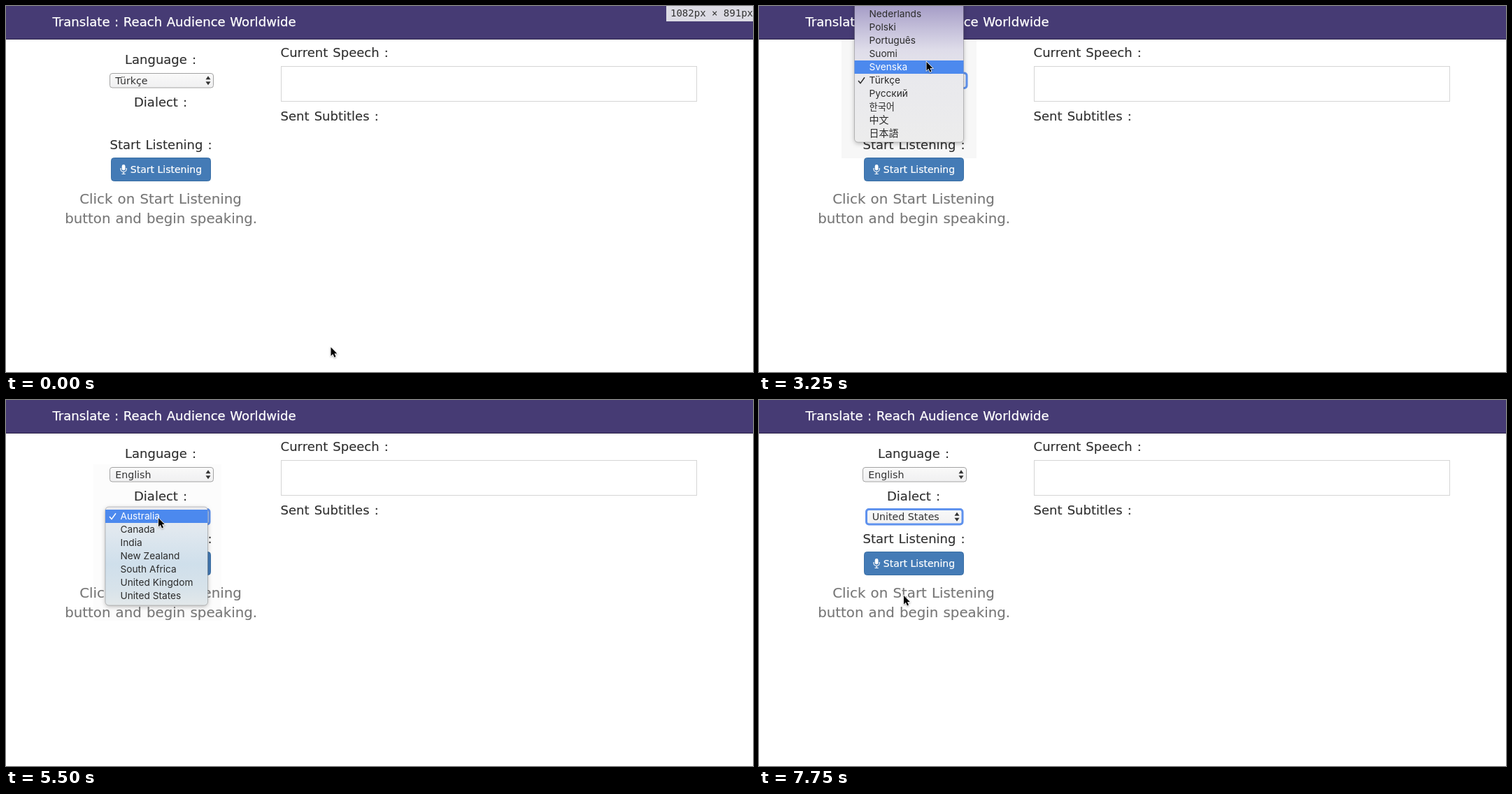
Recreate the animation shown at these times as an HTML page. Size 1068 by 524 pixels, loop 8000 ms.

```html
<!DOCTYPE html>
<html lang="en">
<head>
<meta charset="utf-8">
<title>Translate</title>
<style>
html, body { margin: 0; width: 100%; height: 100%; overflow: hidden; background: #fff; }
svg { display: block; width: 100%; height: 100%; }
text { font-family: "DejaVu Sans", sans-serif; white-space: pre; }
.title { font-size: 18.1px; word-spacing: .8px; fill: #fff; stroke: #fff; stroke-width: .25px; }
.label { font-size: 18px; word-spacing: 1.4px; fill: #2e2e2e; stroke: #2e2e2e; stroke-width: .12px; }
.hint { font-size: 19.8px; word-spacing: .9px; fill: #777; stroke: #777; stroke-width: .12px; }
.value { font-size: 14.2px; fill: #333; }
.button { font-size: 14px; fill: #fff; stroke: #fff; stroke-width: .2px; }
.size { font: 14px "DejaVu Sans Mono", monospace; fill: #333; }
.item { font: 13.7px Inter, "Noto Sans CJK SC", "Noto Sans CJK", sans-serif; fill: #2b2b2b; }
.ko { font-size: 13.2px; font-family: "Noto Sans CJK KR", "Noto Sans CJK", sans-serif; }
.cjk { font-size: 14px; }
.item.on { fill: #fff; }
.panel { stroke: #000; stroke-opacity: .2; filter: drop-shadow(0 2px 3px rgba(0, 0, 0, .25)); }
.tick { fill: none; stroke: #2b2b2b; stroke-width: 1.5; }
</style>
</head>
<body>
<svg viewBox="0 0 1068 524" xmlns="http://www.w3.org/2000/svg">
  <defs>
    <linearGradient id="field" x2="0" y2="1">
      <stop stop-color="#f9f9f9"/><stop offset="1" stop-color="#f0f0f1"/>
    </linearGradient>
    <linearGradient id="overHeader" gradientUnits="userSpaceOnUse" x1="0" x2="0" y1="0" y2="195">
      <stop stop-color="#a69dc7"/><stop offset=".16" stop-color="#c3bed9"/>
      <stop offset=".32" stop-color="#dedce9"/><stop offset=".52" stop-color="#e9e9ed"/>
      <stop offset="1" stop-color="#ececec"/>
    </linearGradient>
    <linearGradient id="overButton" gradientUnits="userSpaceOnUse" x1="0" x2="0" y1="153" y2="294">
      <stop stop-color="#ebebee"/><stop offset=".25" stop-color="#e0e8ef"/>
      <stop offset=".58" stop-color="#cfdfeb"/><stop offset=".85" stop-color="#d8e3ea"/>
      <stop offset="1" stop-color="#e3e8ea"/>
    </linearGradient>
  </defs>

  <rect width="1068" height="524" fill="#fff"/>
  <rect id="languageHalo" x="118" y="48" width="193" height="170" fill="#f7f7f7"/>
  <rect id="dialectHalo" x="125" y="92" width="183" height="224" fill="#fcfcfc"/>

  <rect width="1068" height="47" fill="#463b74"/>
  <rect y="47" width="1068" height="1" fill="#2a2147"/>
  <text class="title" x="66.4" y="28.5">Translate : Reach Audience Worldwide</text>
  <g id="sizeLabel">
    <rect x="944" width="124" height="22" fill="#dcdbe4"/>
    <text class="size" x="950" y="15">1082px × 891px</text>
  </g>

  <text class="label" x="170" y="82.5">Language :</text>
  <text class="label" x="183" y="143.5">Dialect :</text>
  <text class="label" x="148.5" y="204.5">Start Listening :</text>
  <text class="label" x="392.6" y="72.5">Current Speech :</text>
  <text class="label" x="392.6" y="163.5">Sent Subtitles :</text>
  <rect x="393.5" y="86.5" width="594" height="50" fill="#fff" stroke="#d5d5d5"/>

  <g id="selects"></g>

  <rect x="150.5" y="217.5" width="142" height="33" rx="4" fill="#447bb6" stroke="#3a6fa5"/>
  <g fill="none" stroke="#fff" stroke-width="1.2">
    <rect x="165.7" y="227" width="4.8" height="8.5" rx="2.4" fill="#fff" stroke="none"/>
    <path d="M164 232v1.5a4.1 4.1 0 0 0 8.2 0V232M168.1 237.5v3M165.5 240.5h5.2"/>
  </g>
  <text class="button" x="177.8" y="239">Start Listening</text>
  <text class="hint" x="105.3" y="283">Click on Start Listening</text>
  <text class="hint" x="84.2" y="311">button and begin speaking.</text>

  <g id="menus"></g>
  <path id="cursor" d="M0 0V12.4L2.9 9.7 5 14.5 7 13.6 5 8.9H8.8Z" fill="#000" stroke="#fff"
    stroke-width="1.5" paint-order="stroke" style="filter: drop-shadow(0 1px 1px rgba(0,0,0,.3))"/>
</svg>
<script>
const LOOP = 8000, ROW = 19;
const byId = id => document.getElementById(id);

function add(parent, tag, attributes, text = '') {
  const node = document.createElementNS('http://www.w3.org/2000/svg', tag);
  for (const [name, value] of Object.entries(attributes)) node.setAttribute(name, value);
  node.textContent = text;
  return parent.appendChild(node);
}

const show = (node, visible) => node.setAttribute('display', visible ? 'inline' : 'none');

function makeSelect(x, y, width) {
  const group = add(byId('selects'), 'g', { transform: `translate(${x} ${y})` });
  add(group, 'rect', { x: .5, y: .5, width: width - 1, height: 20.5, rx: 3.5,
    fill: 'url(#field)', stroke: '#a3a3a3' });
  const ring = add(group, 'rect', { width, height: 21.5, rx: 3.5,
    fill: 'none', stroke: '#5f92ee', 'stroke-width': 3 });
  const arrow = width - 8;
  add(group, 'path', { d: `M${arrow - 3.5} 9.2l3.5-5 3.5 5zM${arrow - 3.5} 12.3l3.5 5 3.5-5z`, fill: '#333' });
  const value = add(group, 'text', { class: 'value', x: 8.2, y: 15.6 });
  return { group, ring, value };
}

function makeMenu({ x, top, bottom, width, firstRow, textX, fill, items, checked }) {
  const group = add(byId('menus'), 'g', {});
  add(group, 'rect', { class: 'panel', x, y: top, width, height: bottom - top, rx: 5, fill });
  const bar = add(group, 'rect', { x, width, height: ROW, fill: '#4c89ee' });
  const labels = items.map((item, i) => {
    const script = /[가-힣]/.test(item) ? ' ko' : /[一-龥]/.test(item) ? ' cjk' : '';
    return add(group, 'text', { class: 'item' + script, x: textX, y: firstRow + ROW * i + 14 }, item);
  });
  const tick = add(group, 'path', { class: 'tick',
    d: `M${textX - 15.5} ${firstRow + ROW * checked + 10}l3 3.6 6-8.4` });
  return { group, bar, labels, tick, firstRow, checked };
}

function drawMenu(menu, halo, t, opens, fades, closes, selected) {
  const open = t >= opens && t < closes;
  show(menu.group, open);
  show(halo, open);
  menu.group.setAttribute('opacity', t >= fades ? .77 : 1);
  const active = t >= fades ? -1 : selected;
  show(menu.bar, active >= 0);
  menu.bar.setAttribute('y', menu.firstRow + ROW * active);
  menu.labels.forEach((label, i) => label.classList.toggle('on', i === active));
  menu.tick.style.stroke = active === menu.checked ? '#fff' : '';
}

const language = makeSelect(148, 96, 149);
const dialect = makeSelect(153.5, 156.5, 137.5);

const languageMenu = makeMenu({
  x: 136.5, top: -20, bottom: 195, width: 156, firstRow: 2, textX: 157.5,
  fill: 'url(#overHeader)', checked: 5,
  items: ['Nederlands', 'Polski', 'Português', 'Suomi', 'Svenska', 'Türkçe',
    'Русский', '한국어', '中文', '日本語'],
});
const dialectMenu = makeMenu({
  x: 142, top: 153, bottom: 294, width: 146.5, firstRow: 157, textX: 163.5,
  fill: 'url(#overButton)', checked: 0,
  items: ['Australia', 'Canada', 'India', 'New Zealand', 'South Africa', 'United Kingdom', 'United States'],
});

// [start time, x, y]; the pointer is above the stage while y is negative
const pointerPath = [
  [0, 464.5, 488.5], [500, 464.5, 485.5], [750, 339, 329], [1000, 312, 225], [1250, 266, 137],
  [1500, 264, 110], [3250, 239.5, 80], [3500, 239, -60], [4750, 238.5, 81],
  [5000, 235.5, 131], [5250, 218, 169], [6500, 217, 188], [6750, 209, 256], [7000, 207, 280],
];
// [start time, row]
const languageRows = [[0, 5], [3250, 4], [3500, -1]];
const dialectRows = [[0, 0], [6500, 1], [6750, 5], [7000, 6]];
const at = (steps, t) => steps.findLast(([start]) => start <= t);

function draw(t) {
  const [, x, y] = at(pointerPath, t);
  byId('cursor').setAttribute('transform', `translate(${x} ${y})`);
  show(byId('sizeLabel'), t < 1000);

  language.value.textContent = t < 4500 ? 'Türkçe' : 'English';
  dialect.value.textContent = t < 7750 ? 'Australia' : 'United States';
  show(language.ring, t >= 2250 && t < 5500);
  show(dialect.group, t >= 4500);
  show(dialect.ring, t >= 5500);

  drawMenu(languageMenu, byId('languageHalo'), t, 2250, 4250, 4500, at(languageRows, t)[1]);
  drawMenu(dialectMenu, byId('dialectHalo'), t, 5500, 7500, 7750, at(dialectRows, t)[1]);
}

const startTime = performance.now();
function tick() {
  draw((performance.now() - startTime) % LOOP);
  requestAnimationFrame(tick);
}
tick();
</script>
</body>
</html>
```
